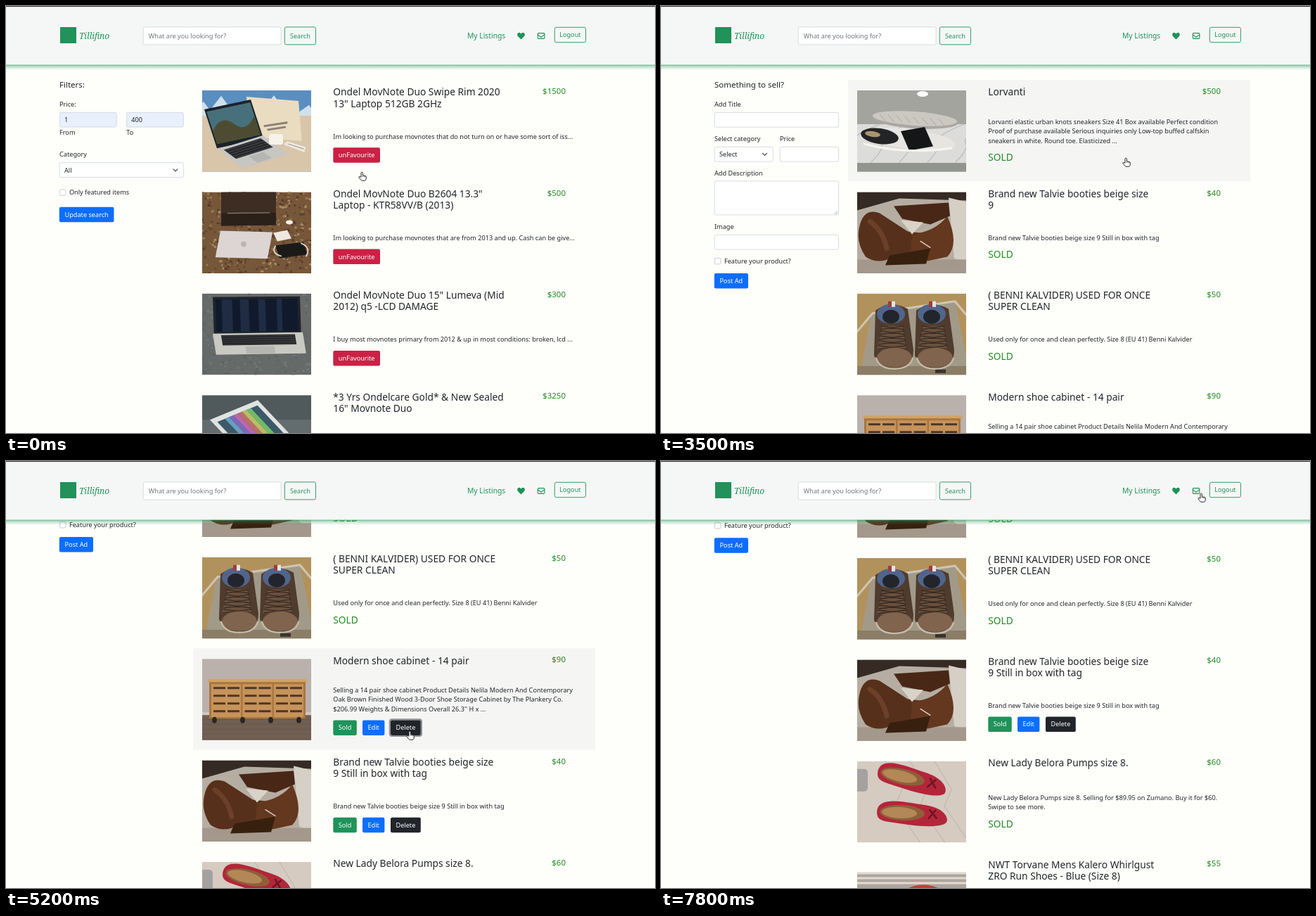
Animation, 923 px wide and 607 px high, one loop 8 s. Source, as an HTML page:

```html
<!DOCTYPE html>
<html lang="en">
<head>
<meta charset="utf-8">
<title>Classified listings</title>
<style>
html, body { margin: 0; width: 100%; height: 100%; overflow: hidden; background: #fefffb; }
svg { display: block; }
text { font-family: "Noto Sans", "Open Sans", sans-serif; white-space: pre; }
</style>
</head>
<body>
<svg id="stage" width="923" height="607" viewBox="0 0 923 607"></svg>
<script>
const INK = '#212529', GREEN = '#20925a', LEAF = '#228b22', BLUE = '#0d6efd', RED = '#cb2144';
const ROW = 144.4, TOP = 105, BASE = 9.17, LEFT = 75.8, COL = 465.3;
const LOOP = 8000;

// ---- drawing helpers ----
const esc = s => s.replace(/&/g, '&amp;');
const text = (x, y, s, size = BASE, fill = INK, anchor = 'start') =>
  `<text x="${x}" y="${y}" font-size="${size}" fill="${fill}" text-anchor="${anchor}">${esc(s)}</text>`;
const rect = (x, y, w, h, fill, more = '') =>
  `<rect x="${x}" y="${y}" width="${w}" height="${h}" fill="${fill}" ${more}/>`;
const path = (d, fill, more = '') => `<path d="${d}" fill="${fill}" ${more}/>`;
const line = (d, color, w = 1) =>
  path(d, 'none', `stroke="${color}" stroke-width="${w}" stroke-linecap="round" stroke-linejoin="round"`);
const oval = (x, y, rx, ry, fill, tilt = 0) =>
  `<ellipse rx="${rx}" ry="${ry}" fill="${fill}" transform="translate(${x} ${y}) rotate(${tilt})"/>`;
const times = (n, fn) => Array.from({ length: n }, (_, i) => fn(i)).join('');

// ---- page controls ----
const field = (x, y, w, h = 21.4, fill = '#fff') =>
  rect(x + .4, y + .3, w - .8, h - .6, fill, 'rx="2.2" stroke="#ced4da" stroke-width=".8"');
const labelled = (label, x, y, w, h) => text(x + .2, y, label) + field(x, y + 8, w, h);
const select = (label, x, y, w, value) => labelled(label, x, y, w) + text(x + 7.2, y + 22.2, value) +
  line(`M${x + w - 15} ${y + 17.4}l3 3 3-3`, '#343a40', 1.1);
const button = (x, y, w, label, fill, color = '#fff', id = '') =>
  `<g${id && ` id="${id}"`}>${rect(x, y, w, 21.5, fill, 'rx="2.2"')}${text(x + w / 2, y + 13.9, label, BASE, color, 'middle')}</g>`;
const outline = (x, y, w, h, label) =>
  rect(x + .5, y + .5, w - 1, h - 1, 'none', `rx="2.4" stroke="${GREEN}" stroke-width=".9"`) +
  text(x + w / 2, y + h / 2 + 3.3, label, BASE, GREEN, 'middle');
const check = (y, label) =>
  rect(LEFT + .6, y, 8.6, 8.6, '#fff', 'rx="1.8" stroke="#b5b9bd" stroke-width=".7"') + text(89.9, y + 7.6, label);

// ---- photographs, 155 by 115.5 ----
const ground = (fill, y = 0) => rect(0, y, 155, 116 - y, fill);

// A 100 by 60 panel laid into perspective.
const panel = (matrix, fill, art = '') => `<g transform="matrix(${matrix})">${rect(0, 0, 100, 60, fill)}${art}</g>`;
const screen = (top, low) => rect(3, 4, 94, 50, top) + path('M3 34Q30 12 50 30T97 24V54H3Z', low);
const keys = rect(9, 5, 82, 29, '#242628') + rect(34, 38, 32, 20, '#b5b5b2') +
  times(5, i => line(`M10 ${8 + i * 6}H90`, '#62656a', .8));

// Seeded grain for rough surfaces.
function grain(n, seed, colors) {
  const rnd = max => (seed = seed * 16807 % 2147483647) / 2147483647 * max;
  return times(n, i => oval(rnd(155), rnd(116), 1 + rnd(1.5), 1 + rnd(1), colors[i % colors.length]));
}

const boot = x => `<g transform="translate(${x} 0)">` +
  path('M2 24Q24 8 48 22L56 80Q56 108 32 108T0 88Z', '#4f3c2e') +
  oval(24, 29, 20, 14, '#51658c') + oval(24, 33, 12, 10, '#23252c') + path('M12 46H40L46 80H4Z', '#6a513e') +
  times(5, i => line(`M${10 - i} ${46 + i * 7}l${32 + i * 2} 5m0-5l${-32 - i * 2} 5`, '#35281f', 1.3)) +
  oval(29, 91, 25, 14, '#80644d') + line('M3 92Q8 107 29 107T55 92', '#c4baab', 2.5) +
  rect(20, 11, 5, 8, '#a33a3c') + rect(25, 11, 5, 8, '#e4e4e4') + '</g>';

const pump = (y, tilt) => `<g transform="translate(78 ${y}) rotate(${tilt})">` +
  path('M-50-2C-48-24-10-16 16-14S52 0 50 8 20 18-10 15-50 14-50-2Z', '#b3263a') +
  oval(-14, -1, 32, 11, '#8e5f39') + oval(-18, -1, 25, 8, '#b48757') + line('M25-7l10 11M33-7L24 5', '#6d1422', 2.5) + '</g>';

const photos = {
  desk: ground('#5b8ec0') + times(7, i => path(`M${i * 25 - 20} 36l22-${20 + 9 * Math.sin(i * 2)} 22 30Z`, '#cfe0ec')) +
    ground('#d8c5aa', 36) + panel('.74 .06 .08 .95 63 9', '#eadcc0', line('M30 42l44-8M36 47l34-6', '#8b8175', 3)) +
    panel('.66 -.14 .3 .92 3 27', '#1a2228', screen('#486f7c', '#4d4c32')) +
    panel('.64 -.2 .6 .44 22 84', '#c6c6c3', keys) + rect(95, 62, 20, 15, '#f6f3ea', 'rx="3"') +
    line('M118 76l27 10M121 74l25 8', '#eeeae0', 3) + line('M122 76l22 7', '#9a958d'),
  granite: ground('#775739') + grain(420, 71, ['#50392a', '#98764c', '#684a32', '#a88a65', '#5a412c']) +
    panel('.78 -.01 0 .8 27 0', '#3d2d22', rect(0, 38, 100, 22, '#2b211b') + line('M12 38H88', '#8e7c66', 1.5)) +
    panel('.74 .02 -.12 .63 26 55', '#dcd5d4') + oval(59, 74, 4, 4, '#bcb5b4') + oval(124, 43, 5, 3, '#fff7e7') +
    panel('.2 -.04 .1 .2 101 58', '#eee8e0') + panel('.4 -.05 .1 .3 104 76', '#1c1a19') +
    line('M104 77q-6 10 8 14M141 73q14 6 7 18', '#d8d1c8', 2),
  carpet: ground('#666a69') + grain(320, 19, ['#5d6262', '#737776', '#626766']) +
    panel('1.24 -.01 .03 .88 15 5', '#20242a', rect(3, 4, 94, 52, '#111a2d') +
      times(4, i => rect(10 + i * 21, 4, 12 - i * 2, 52, '#26344f', 'opacity=".7"'))) +
    panel('1.28 -.02 .08 .5 15 57', '#c9c9c3', keys),
  sealed: ground('#50595b') + ground('#636d6f', 35) + panel('.68 -.28 .85 .9 11 35', '#e1e3e2',
    rect(8, 6, 84, 50, '#3c5968') + times(6, i => rect(24 + i * 9, 6, 9, 50, `hsl(${200 + i * 55} 38% 57%)`))),
  sneaker: ground('#a3a49e') + ground('#dcdcda', 48) + ground('#91958d', 103) + oval(93, 5, 8, 4, '#fff') +
    times(5, i => line(`M${i * 40 - 20} 102q20-20 14-28t38-26`, '#b9babd', 1.3)) +
    oval(82, 42, 62, 12, '#aaa7a2', 4) + oval(82, 40, 60, 10, '#cbc8c1', 4) +
    times(8, i => line(`M${32 + i * 12} ${34 + i}l8 9`, '#aaa7a2', 1)) +
    oval(74, 69, 66, 14, '#e6e5e2', 7) + oval(32, 65, 27, 11, '#232426', 8) + oval(22, 62, 11, 4, '#a9946e', 8) +
    panel('.34 -.06 .2 .46 62 58', '#151617') + line('M10 76Q70 92 134 82', '#f6f5f1', 3),
  suede: ground('#b6ada2') + path('M0 0H155V12L60 9 0 26Z', '#352a24') + path('M130 8L155 14V102L138 94Z', '#d5cfc5') +
    ground('#a3988b', 96) + path('M3 50Q9 22 32 30L72 56 108 60 106 88 52 92Q30 104 12 92-2 72 3 50Z', '#57301c') +
    path('M52 20L130 15 132 34 104 46 64 38Z', '#482717') + path('M78 60Q112 56 128 34 146 74 128 92L100 98 76 84Z', '#64371f') +
    path('M62 40L94 43 78 60Z', '#d9d2c7') + path('M46 90L104 80 98 102 40 104Z', '#38200f') +
    line('M18 42Q36 54 42 80', '#6c4028', 7) + line('M78 58l12-14M90 70l14 9', '#ddd5c9', 1.3),
  boots: ground('#b2925c') + path('M20 28L139 10 155 90V116H4Z', '#a29a89') + ground('#8b7d66', 103) +
    line('M0 54L22 28 139 11 155 30', '#cfc5b3', 3) + boot(24) + boot(82) + rect(111, 108, 15, 5, '#39332e'),
  cabinet: ground('#bab1ac') + ground('#d1c9c3', 76) + ground('#705f53', 80) +
    times(5, i => line(`M0 ${86 + i * 7}H155`, '#655347', .7)) + rect(8, 29, 141, 5, '#d2a366') + rect(10, 33, 137, 52, '#a87640') +
    times(3, d => rect(13 + d * 44.5, 36, 42, 47, '#c6935a') + times(8, i =>
      rect(16 + d * 44.5 + i % 2 * 20, 40 + (i >> 1) * 11, 17, 3, '#4e3725'))) +
    times(4, i => oval(17.5 + i * 40, 87, 3.4, 4.5, '#292624')),
  pumps: ground('#d5cbc1') + times(3, i => line(`M${40 + i * 35} 0l24 40-10 24 36 52`, '#c3b8ae', 1.2)) +
    rect(-5, 11, 20, 32, '#a5a1a1', 'rx="5"') + pump(26, 13) + pump(75, 3),
  runner: ground('#aea59d') + times(3, i => rect(0, i * 7, 155, 3, '#e2dbd4')) + oval(94, 34, 30, 16, '#c53f31')
};

// ---- listings ----
const item = (pic, price, title, desc, foot) => ({ pic, price, title, desc, foot });
const searchRows = [
  item('desk', 1500, ['Ondel MovNote Duo Swipe Rim 2020', '13" Laptop 512GB 2GHz'],
    ['Im looking to purchase movnotes that do not turn on or have some sort of iss...'], 'toggle'),
  item('granite', 500, ['Ondel MovNote Duo B2604 13.3"', 'Laptop - KTR58VV/B (2013)'],
    ['Im looking to purchase movnotes that are from 2013 and up. Cash can be give...'], 'fav'),
  item('carpet', 300, ['Ondel MovNote Duo 15" Lumeva (Mid', '2012) q5 -LCD DAMAGE'],
    ['I buy most movnotes primary from 2012 & up in most conditions: broken, lcd ...'], 'fav'),
  item('sealed', 3250, ['*3 Yrs Ondelcare Gold* & New Sealed', '16" Movnote Duo'], [], '')
];
const bootieTitle = 'Brand new Talvie booties beige size';
const bootieText = [bootieTitle + ' 9 Still in box with tag'];
const myRows = [
  item('sneaker', 500, ['Lorvanti'], [
    'Lorvanti elastic urban knots sneakers Size 41 Box available Perfect condition',
    'Proof of purchase available Serious inquiries only Low-top buffed calfskin',
    'sneakers in white. Round toe. Elasticized ...'], 'sold'),
  item('suede', 40, [bootieTitle, '9'], bootieText, 'sold'),
  item('boots', 50, ['( BENNI KALVIDER) USED FOR ONCE', 'SUPER CLEAN'],
    ['Used only for once and clean perfectly. Size 8 (EU 41) Benni Kalvider'], 'sold'),
  item('cabinet', 90, ['Modern shoe cabinet - 14 pair'], [
    'Selling a 14 pair shoe cabinet Product Details Nelila Modern And Contemporary',
    'Oak Brown Finished Wood 3-Door Shoe Storage Cabinet by The Plankery Co.',
    "$206.99 Weights & Dimensions Overall 26.3'' H x ..."], 'edit'),
  item('suede', 40, [bootieTitle, '9 Still in box with tag'], bootieText, 'edit'),
  item('pumps', 60, ['New Lady Belora Pumps size 8.'], [
    'New Lady Belora Pumps size 8. Selling for $89.95 on Zumano. Buy it for $60.', 'Swipe to see more.'], 'sold'),
  item('runner', 55, ['NWT Torvane Mens Kalero Whirlgust', 'ZRO Run Shoes - Blue (Size 8)'], [], '')
];

const ring = y => rect(545.9, y - 1.1, 45, 23.7, 'none', 'id="ring" rx="3" stroke="#909294" stroke-width="2.2"');
const feet = {
  sold: y => text(COL, y + 12.7, 'SOLD', 13.75, LEAF),
  fav: y => button(COL, y, 66.7, 'unFavourite', RED),
  toggle: y => button(COL, y, 66.7, 'unFavourite', RED, '#fff', 'unfav') +
    button(COL, y, 55.6, 'Favourite', '#f3c316', '#111', 'refav'),
  edit: (y, pic) => button(COL, y, 33.5, 'Sold', GREEN) + button(507, y, 31.4, 'Edit', BLUE) +
    (pic === 'cabinet' ? ring(y) : '') + button(547, y, 42.8, 'Delete', INK)
};

function listing({ pic, price, title, desc, foot }, i) {
  const y = TOP + ROW * i, n = desc.length;
  const last = y + (n > 2 ? 89.5 : 83.5);
  const drop = pic === 'runner' ? 28.3 : 15;
  return `<use href="#${pic}" x="279" y="${y + drop}" width="155" height="115.5"/>` +
    title.map((s, k) => text(COL, y + 22.4 + k * 16.1, s, 13.75)).join('') +
    text(796, y + 20.1, '$' + price, 11.5, LEAF, 'end') +
    desc.map((s, k) => text(COL, last - (n - 1 - k) * 13.5, s)).join('') +
    (foot && feet[foot](last + 12.7, pic));
}
const listings = (rows, first = 0) => rows.map((r, i) => listing(r, first + i)).join('');

const filters = text(76, 116, 'Filters:', 11.5) + text(76, 143.2, 'Price:') +
  [['1', 'From', LEFT], ['400', 'To', 171]].map(([value, label, x]) =>
    field(x, 151, 81.8, 21.4, '#e8f0fe') + text(x + 7.3, 165, value) + text(x + .2, 183, label)).join('') +
  select('Category', LEFT, 214.4, 177.2, 'All') +
  check(260.8, 'Only featured items') + button(LEFT, 285.8, 77.7, 'Update search', BLUE);

const sellForm = text(76, 116, 'Something to sell?', 11.5) + labelled('Add Title', LEFT, 143.1, 177.2) +
  select('Select category', LEFT, 192, 83.8, 'Select') + labelled('Price', 168.7, 192, 84.3) +
  labelled('Add Description', LEFT, 240.5, 177.2, 48.7) + line('M251 291.5l-4 4M251 294l-1.5 1.5', '#777', .6) +
  labelled('Image', LEFT, 317, 177.2) + check(358.4, 'Feature your product?') + button(LEFT, 380, 48.2, 'Post Ad', BLUE);

const header = rect(0, 83, 923, 8, 'url(#glow)') + rect(0, 0, 923, 83.6, '#f5f7f6') + rect(77, 30, 23, 23, GREEN) +
  `<text x="104" y="47" font-size="12" font-style="italic" fill="${GREEN}" style="font-family:'Noto Serif',serif">Tillifino</text>` +
  field(194.8, 29.6, 196.7, 25.8) + text(202.8, 46, 'What are you looking for?', BASE, '#70777d') +
  outline(395.8, 29.4, 45.2, 26, 'Search') + text(656, 46.2, 'My Listings', 10.3, GREEN) +
  path('M732.5 47.6L728 43Q726 40 728.4 38.2 730.8 37 732.5 39.5 734.2 37 736.6 38.2 739 40 737 43Z', GREEN) +
  rect(756.3, 38.6, 9.6, 7.8, 'none', `rx="1.2" stroke="${GREEN}" stroke-width="1.1"`) +
  line('M756.5 41l4.6 3.2 4.6-3.2', GREEN, 1.1) + outline(779.8, 29.8, 45.2, 22.4, 'Logout');

const hand = path('M-2 1.2V-4.6a1.2 1.2 0 0 1 2.4 0V-1.2l3.7.7q1.4.4 1.3 1.8L5 4.3q-.3 1.5-1.2 1.9H-.8q-1-.2-1.8-1.4L-5 1.8q-.6-1 .3-1.4.9-.3 1.7.4Z',
  '#fff', 'stroke="#222" stroke-linejoin="round"') + line('M.5-1v1.6M2.4-.6V.9M4 0v1.3', '#444', .6);

const $ = id => document.getElementById(id);
const group = (id, art) => `<g id="${id}">${art}</g>`;
const glow = '<linearGradient id="glow" x2="0" y2="1">' +
  [[0, .8], [.35, .3], [1, 0]].map(([at, a]) => `<stop offset="${at}" stop-color="${GREEN}" stop-opacity="${a}"/>`).join('') +
  '</linearGradient>';
const symbols = Object.entries(photos).map(([id, art]) => `<symbol id="${id}" viewBox="0 0 155 115.5">${art}</symbol>`).join('');

$('stage').innerHTML = `<defs>${glow}${symbols}</defs>` +
  group('site', group('scroll', rect(266, 0, 572, ROW, '#f5f5f4', 'id="hover"') +
    group('search', filters + listings(searchRows)) +
    group('mine', sellForm + listings(myRows.slice(0, 3)) +
      group('before', listings(myRows.slice(3, 6), 3)) +
      group('after', listings(myRows.slice(4), 3)))) + header) +
  rect(0, 0, 923, 1.1, '#333') + group('hand', hand);

// ---- motion ----
// Pointer stops: time, x, y.
const stops = [
  [0, 507, 242], [400, 507, 242], [600, 500, 214], [1200, 533, 214], [1500, 533, 214],
  [2600, 694, 48], [3000, 693, 60], [3300, 693, 91], [3500, 662, 222], [4000, 638, 292], [4500, 638, 298],
  [5200, 575, 390], [5400, 588, 444], [6000, 598, 475], [7100, 598, 475], [7600, 727, 165], [7800, 769, 52]
];
const smooth = f => f * f * (3 - 2 * f);

function pointer(t) {
  const n = stops.findIndex(s => s[0] > t);
  if (n < 0) return stops[stops.length - 1].slice(1);
  const [t0, x0, y0] = stops[n - 1], [t1, x1, y1] = stops[n];
  const f = smooth((t - t0) / (t1 - t0));
  return [x0 + (x1 - x0) * f, y0 + (y1 - y0) * f];
}

// Eight wheel notches of 34 px; the reload settles slightly higher.
const scrolled = t => 34 * Math.min(8, Math.max(0, Math.floor((t - 3550) / 150))) - (t < 6400 ? 0 : 1.2);

const show = (id, on) => $(id).setAttribute('visibility', on ? 'inherit' : 'hidden');

function draw(ms) {
  const t = Math.floor(ms % LOOP / 100) * 100;
  const [x, y] = pointer(t), top = scrolled(t);
  const row = Math.floor((y - 6 + top - TOP) / ROW);
  show('site', t < 6400 || t >= 6800);
  show('search', t < 2800);
  show('mine', t >= 2800);
  show('before', t < 6400);
  show('after', t >= 6400);
  show('unfav', t < 800);
  show('refav', t >= 800);
  show('ring', t >= 5100);
  show('hover', t >= 400 && y > 90 && row >= 0);
  $('unfav').firstChild.setAttribute('fill', t < 600 ? RED : '#b01c3b');
  $('hover').setAttribute('y', TOP + row * ROW);
  $('scroll').setAttribute('transform', `translate(0 ${-top})`);
  $('hand').setAttribute('transform', `translate(${x} ${y})`);
}

const start = performance.now();
function tick() {
  draw(performance.now() - start);
  requestAnimationFrame(tick);
}
tick();
</script>
</body>
</html>
```
